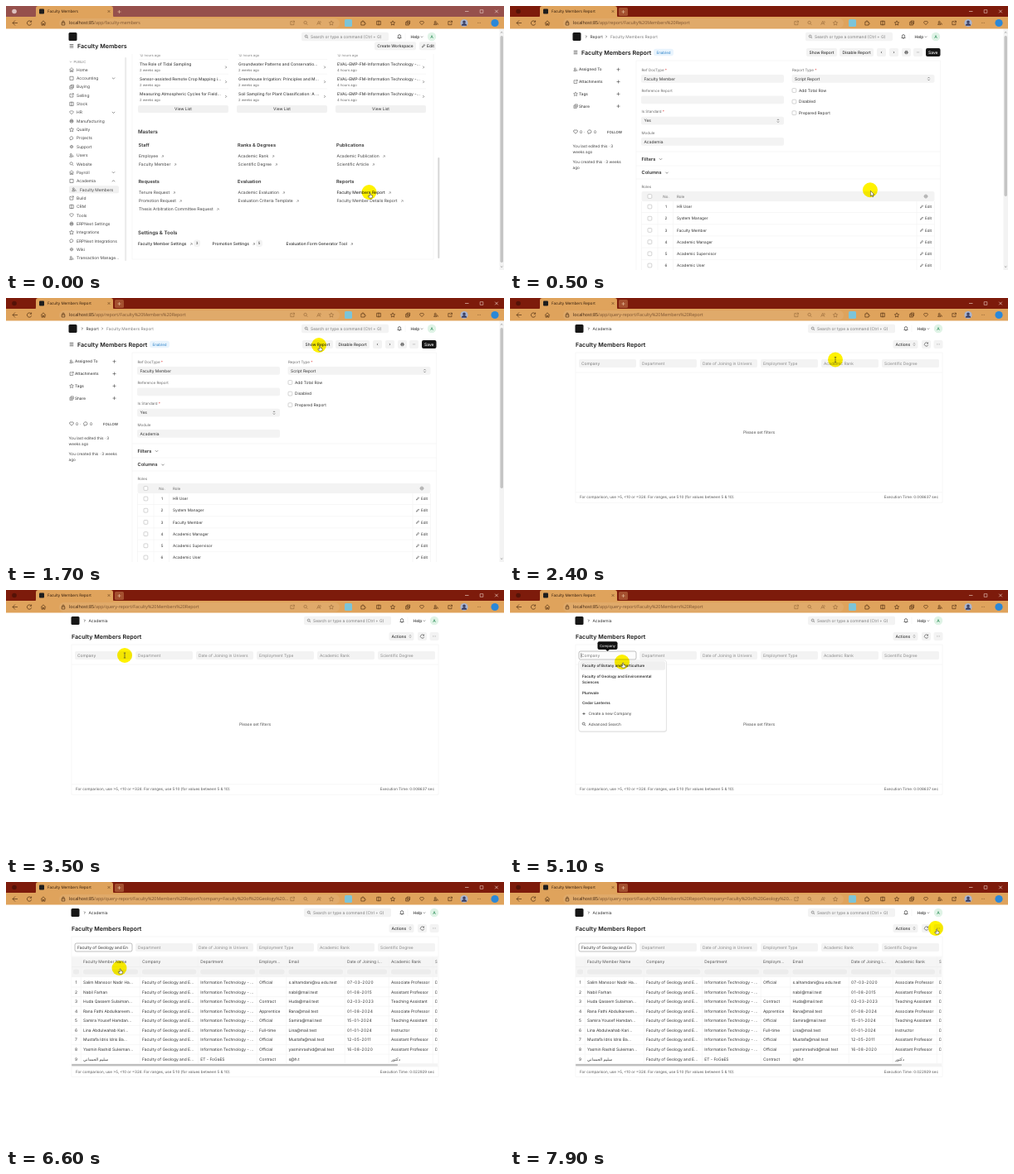
An HTML page for the animation above (8000 ms loop, 600 by 319 pixels).

```html
<!DOCTYPE html>
<html lang="en">
<head>
<meta charset="utf-8">
<title>Faculty Members Report</title>
<style>
html, body { margin: 0; width: 100%; height: 100%; overflow: hidden; background: #fff; }
svg { display: block; width: 100%; height: 100%; font-family: Inter, "Noto Sans", sans-serif; text-rendering: geometricPrecision; }
.chrome { font-family: "Open Sans", "Noto Sans", sans-serif; }
#halo { mix-blend-mode: multiply; }
</style>
</head>
<body>
<svg id="stage" viewBox="0 0 600 319"></svg>
<script>
const INK = '#333', GRAY = '#7c7c7c', PALE = '#f3f3f3', LINE = '#f1f1f1', BROWN = '#4a2a10', TAN = '#96693a';

const escape = s => String(s).replace(/&/g, '&amp;').replace(/</g, '&lt;');
// y is the vertical middle of the text
const text = (x, y, s, { size = 4.9, fill = INK, weight = 400, anchor = 'start', space = 0, tail = '' } = {}) =>
  `<text x="${x}" y="${y + size * .36}" font-size="${size}" fill="${fill}" font-weight="${weight}" text-anchor="${anchor}"${space ? ` letter-spacing="${space}"` : ''}>${escape(s)}${tail}</text>`;
const rect = (x, y, w, h, fill = PALE, r = 0, stroke = 'none') =>
  `<rect x="${x}" y="${y}" width="${w}" height="${h}" rx="${r}" fill="${fill}" stroke="${stroke}" stroke-width=".6"/>`;
const circle = (x, y, r, fill) => `<circle cx="${x}" cy="${y}" r="${r}" fill="${fill}"/>`;
const path = (d, stroke = LINE, width = .6, fill = 'none') =>
  `<path d="${d}" stroke="${stroke}" stroke-width="${width}" fill="${fill}"/>`;
const hline = (x1, x2, y, color) => path(`M${x1} ${y}H${x2}`, color);
const vline = (x, y1, y2, color) => path(`M${x} ${y1}V${y2}`, color);
const group = (id, body) => `<g id="${id}">${body}</g>`;
const each = (items, fn) => items.map(fn).join('');

// icons drawn around 0,0 in a box of about 6 px
const ICONS = {
  back: 'M3 0H-3M0-3L-3 0L0 3',
  refresh: 'M2.3-1.5A2.7 2.7 0 1 0 2.7 .8M2.6-3V-1.2H.8',
  home: 'M-2.7 0L0-2.7L2.7 0M-2-.5V2.7H-.6V.8H.6V2.7H2V-.5',
  lock: 'M-1.8-.4H1.8V2.5H-1.8ZM-1.1-.4V-1.4A1.1 1.1 0 0 1 1.1-1.4V-.4',
  open: 'M0-2H-2.3V2.3H2V0M.5-2.5H2.5V-.5M2.5-2.5L0 0',
  search: 'M-2.2-.5A1.8 1.8 0 1 0 1.4-.5A1.8 1.8 0 1 0-2.2-.5M1 .9L2.5 2.5',
  letter: 'M-2.5 2.3L-.3-2.3L2 2.3M-1.7 .8H1.2M1.5-2.5Q3-1.5 1.8 0',
  star: 'M0-2.8L.9-.9L2.8-.7L1.4 .7L1.8 2.7L0 1.7L-1.8 2.7L-1.4 .7L-2.8-.7L-.9-.9Z',
  box: 'M-2.3-2.3H2.3V2.3H-2.3Z',
  split: 'M-2.5-2.3H2.5V2.3H-2.5ZM0-3V3',
  stack: 'M-2.5-1H1.5V2.7H-2.5ZM-1-1V-2.6H2.7V1H1.5M-.5 0V1.8M-1.4 .9H.4',
  heart: 'M0 2.3L-2.2 0A1.3 1.3 0 0 1 0-1.6A1.3 1.3 0 0 1 2.2 0Z',
  bubble: 'M-2 1A2.2 2 0 1 1 0 1.8L-1.8 2.3Z',
  plus: 'M-2 0H2M0-2V2',
  close: 'M-1.8-1.8L1.8 1.8M1.8-1.8L-1.8 1.8',
  menu: 'M-2.3-1.8H2.3M-2.3 0H2.3M-2.3 1.8H2.3',
  down: 'M-1.6-.8L0 .8L1.6-.8',
  up: 'M-1.6 .8L0-.8L1.6 .8',
  right: 'M-.7-1.4L.7 0L-.7 1.4',
  left: 'M.7-1.4L-.7 0L.7 1.4',
  sort: 'M-1.1-.7L0-1.9L1.1-.7M-1.1 .7L0 1.9L1.1 .7',
  bell: 'M-2.2 1.5H2.2L1.6 .5V-.8A1.6 1.6 0 0 0-1.6-.8V.5ZM-.6 2.5H.6',
  dots: 'M-2-.1H-1.4M-.3-.1H.3M1.4-.1H2',
  print: 'M-1.3-.6V-2.2H1.3V-.6M-1.3 1.2H-2.2V-.6H2.2V1.2H1.3M-1.3 .4H1.3V2.2H-1.3Z',
  gear: 'M-1.8-1L0-2.1L1.8-1V1L0 2.1L-1.8 1ZM-.6 0A.6 .6 0 1 0 .6 0A.6 .6 0 1 0-.6 0',
  pencil: 'M-1.8 1.8L-1.4 .4L1.2-2L2-1.2L-.5 1.4Z',
  people: 'M-2.5 2.2Q-2.3 .2-.8 .2T1 2.2ZM-1.9-1.1A1.1 1.1 0 1 0 .3-1.1A1.1 1.1 0 1 0-1.9-1.1M1 0Q2.5 .2 2.6 2.2',
  puzzle: 'M-2.3-1.4H-.8A.9 .9 0 1 1 .8-1.4H2V.1A.9 .9 0 1 1 2 1.5V2.7H-2.3Z',
};
const icon = (name, x, y, color = '#555', width = .65, scale = 1) =>
  `<g transform="translate(${x} ${y}) scale(${scale})">${path(ICONS[name], color, width)}</g>`;
const button = (x, w, y, label, fill = PALE, ink = INK) =>
  rect(x, y - 5, w, 10, fill, 2) + text(x + w / 2, y, label, { fill: ink, weight: 500, anchor: 'middle' });
const iconButton = (x, y, name) => rect(x, y - 5, 11, 10, PALE, 2) + icon(name, x + 5.5, y, INK, .7, .8);

function browser() {
  const pageTools = [['open', 345], ['search', 361], ['letter', 377], ['star', 392]];
  const tools = [['puzzle', 430], ['split', 449], ['star', 466], ['stack', 484], ['heart', 501], ['people', 518], ['open', 535], ['dots', 570]];
  const toolRow = (items, color) => each(items, ([name, x]) => icon(name, x, 20.5, color, .65, .95));
  return `<g class="chrome">` + group('titleBar', rect(0, 0, 600, 14, 'inherit')) + rect(0, 13, 600, 14.5, '#dfa35c') +
    path('M34 14Q36 14 36 11V3Q36 0 39 0H126Q129 0 129 3V11Q129 14 131 14Z', 'none', 0, '#dfa35c') +
    group('windowIcons', circle(10, 6.5, 2.8, 'inherit') + icon('box', 27, 6.5, 'inherit')) +
    rect(40, 3.5, 6, 6, '#1d1d1d', 1) + icon('close', 124, 6.5, BROWN, .6, .8) +
    group('newTab', rect(131, 2, 11, 10, '#a4502f', 1.5)) + icon('plus', 136.5, 7, '#e8c3a0') +
    path('M553 6.5H557.5', '#f3dcd2') + icon('box', 573, 6.5, '#f3dcd2', .7, .8) + icon('close', 591, 6.5, '#f3dcd2') +
    rect(64, 15, 338, 11.5, '#e0aa6a', 5.7) +
    icon('back', 11, 20.5, BROWN) + icon('refresh', 28, 20.5, BROWN) + icon('home', 45, 20.5, BROWN) + icon('lock', 69, 20.5, BROWN) +
    toolRow(pageTools, TAN) + toolRow(tools, BROWN) +
    rect(408, 16, 9, 9, '#7cc4d8', 1.5) + circle(552, 20.5, 4.6, '#a9b4cf') +
    circle(552, 19.2, 1.7, '#3b3f63') + path('M548.8 23.7Q549 21 552 21T555.2 23.7Z', 'none', 0, '#3b3f63') +
    circle(589, 20.5, 4.6, '#2b88d8') +
    `<text id="tab" x="50" y="8.3" font-size="4.65" fill="#2a1608"></text>` +
    `<text x="76" y="22.4" font-size="5.37" fill="#3a200e">localhost:85<tspan id="url" fill="#7a5230"></tspan></text></g>`;
}

const navbar = dx => `<g transform="translate(${dx} 0)">` + rect(75.5, 32, 10, 10, '#171717', 1.5) +
  rect(356, 31.7, 105, 10.6, PALE, 2) + icon('search', 362, 37, '#555', .7, .8) +
  text(367, 37, 'Search or type a command (Ctrl + G)', { fill: GRAY }) +
  icon('bell', 474, 37, INK) + vline(481, 33, 41) + text(487.5, 37, 'Help', { weight: 500 }) + icon('down', 501, 37.2, INK, .6, .8) +
  circle(513, 37, 5.2, '#dff3e6') + text(513, 37, 'A', { size: 5, fill: '#2f8f5b', anchor: 'middle', weight: 500 }) + '</g>';

const title = (x, y, s) => text(x, y, s, { size: 7.1, weight: 600, fill: '#171717' });
const crumbs = (x, s, more = '') => icon('right', x - 4.7, 37, INK) + text(x, 37, s) + more;
const scrollTrack = thumb => rect(594.5, 27.5, 5.5, 292, '#f3f3f3') + icon('up', 597.2, 32, '#777', .8, .8) +
  icon('down', 597.2, 315, '#777', .8, .8) + rect(595.5, 36, 3.5, thumb, '#c4c4c4', 1.7);

function workspace() {
  const menu = ['Home', 'Accounting', 'Buying', 'Selling', 'Stock', 'HR', 'Manufacturing', 'Quality', 'Projects', 'Support', 'Users',
    'Website', 'Payroll', 'Academia', 'Faculty Members', 'Build', 'CRM', 'Tools', 'ERPNext Settings', 'Integrations',
    'ERPNext Integrations', 'Wiki', 'Transaction Manage...'];
  const shapes = ['home', 'box', 'stack', 'open', 'split', 'heart', 'print', 'star', 'bubble', 'gear', 'people', 'search'];
  const folds = { Accounting: 'down', HR: 'down', Payroll: 'down', Academia: 'up' };
  const sidebar = each(menu, (label, i) => {
    const y = 77 + i * 10.34, child = label === 'Faculty Members';
    return (child ? rect(76, y - 4.6, 60, 9.2, '#f0f0f0', 2) : '') +
      icon(child ? 'people' : shapes[i % shapes.length], child ? 82 : 79, y, '#555', .65, .9) +
      text(child ? 89 : 85, y, label, { fill: '#444' }) + (folds[label] ? icon(folds[label], 129.5, y) : '');
  });
  const evaluation = 'EVAL-EMP-FM-Information Technology -...';
  const lists = [
    [161, '2 weeks ago', ['The Role of Tidal Sampling', 'Sensor-assisted Remote Crop Mapping i...', 'Measuring Atmospheric Cycles for Field...']],
    [280, '2 weeks ago', ['Groundwater Patterns and Conservatio...', 'Greenhouse Irrigation: Principles and M...', 'Soil Sampling for Plant Classification: A ...']],
    [399, '4 hours ago', [evaluation, evaluation, evaluation]]];
  const cards = each(lists, ([x, age, names]) => text(x, 59.7, '12 hours ago', { size: 4.2, fill: GRAY }) +
    each(names, (name, i) => {
      const y = 70.5 + i * 17.7;
      return hline(x - 1, x + 107, y - 6) + text(x, y, name, { size: 4.9, weight: 500, fill: '#444' }) +
        text(x, y + 7.2, age, { size: 4.2, fill: '#666' }) + icon('right', x + 104, y + 3.5);
    }) + rect(x - 2, 120, 109, 9, '#f1f1f1', 2) + text(x + 52.5, 124.5, 'View List', { anchor: 'middle' }));
  const arrow = '<tspan dx="4" font-size="4.4" fill="#555">↗</tspan>';
  const links = [
    [159.5, 168, 'Staff', ['Employee', 'Faculty Member']],
    [279, 168, 'Ranks & Degrees', ['Academic Rank', 'Scientific Degree']],
    [398, 168, 'Publications', ['Academic Publication', 'Scientific Article']],
    [159.5, 212, 'Requests', ['Tenure Request', 'Promotion Request', 'Thesis Arbitration Committee Request']],
    [279, 212, 'Evaluation', ['Academic Evaluation', 'Evaluation Criteria Template']],
    [398, 212, 'Reports', ['Faculty Members Report', 'Faculty Member Details Report']]];
  const heading = (x, y, s, size) => text(x, y, s, { size, weight: 600 });
  const badge = (x, n) => rect(x - 4, 282.5, 8, 8.5, PALE, 3) + text(x, 286.8, n, { size: 4.4, anchor: 'middle' });
  const setting = (x, s) => text(x, 286.8, s, { weight: 500, tail: arrow });
  return cards + rect(72, 27.5, 450, 31, '#fff') + navbar(0) +
    icon('menu', 79, 48.3, INK) + title(86, 48.3, 'Faculty Members') +
    button(444, 50, 48.3, 'Create Workspace') + rect(498, 43.3, 20, 10, PALE, 2) +
    icon('pencil', 503, 48.3, INK, .65, .9) + text(507, 48.3, 'Edit', { weight: 500 }) +
    icon('down', 78, 67.5, GRAY, .6, .8) + text(81.5, 67.5, 'PUBLIC', { size: 4.1, fill: GRAY }) + sidebar +
    rect(143, 62, 2.2, 246, '#ececec', 1) + vline(152, 58, 306) + vline(515, 58, 306) + hline(152, 515, 306) +
    rect(520.3, 183, 2, 122, '#d6d6d6', 1) +
    heading(159, 151.5, 'Masters', 6.1) + heading(159, 273.5, 'Settings & Tools', 6.1) +
    each(links, ([x, y, head, items]) => heading(x, y, head, 5.65) +
      each(items, (s, i) => text(x + .5, y + 12.7 + i * 10.3, s, { size: 5, tail: arrow, fill: s === 'Faculty Members Report' ? '#111' : '#444' }))) +
    setting(159, 'Faculty Member Settings') + badge(230, 3) + setting(248.5, 'Promotion Settings') + badge(305, 5) +
    setting(337.5, 'Evaluation Form Generator Tool') + scrollTrack(274);
}

function reportForm() {
  const small = { size: 4.5, fill: '#6a6a6a' };
  const star = '<tspan fill="#e24c4c"> *</tspan>';
  const field = (x, y, label, value, required, select) => text(x, y, label, { ...small, tail: required ? star : '' }) +
    rect(x - .5, y + 6, 172, 9.7, PALE, 2) + text(x + 3, y + 11, value) + (select ? icon('sort', x + 164.5, y + 11) : '');
  const check = (x, y) => rect(x, y - 2.4, 4.8, 4.8, '#fff', 1, '#b5b5b5');
  const roles = ['HR User', 'System Manager', 'Faculty Member', 'Academic Manager', 'Academic Supervisor', 'Academic User'];
  const notes = [[169, 'You last edited this · 3'], [176, 'weeks ago'], [188, 'You created this · 3 weeks'], [195, 'ago']];
  return navbar(0) + crumbs(96.5, 'Report', icon('right', 116, 37) + text(121, 37, 'Faculty Members Report', { fill: GRAY })) +
    icon('menu', 79, 56, INK) + title(86, 56, 'Faculty Members Report') +
    rect(173, 51.7, 24, 8.6, '#e9f4fd', 3) + text(185, 56, 'Enabled', { size: 4.5, fill: '#2f84c9', anchor: 'middle' }) +
    button(357, 37, 56, 'Show Report') + button(397, 41, 56, 'Disable Report') +
    each([[442, 'left'], [457, 'right'], [472, 'print'], [486, 'dots']], ([x, name]) => iconButton(x, 56, name)) +
    button(501, 17.5, 56, 'Save', '#171717', '#fff') +
    each(['Assigned To', 'Attachments', 'Tags', 'Share'], (s, i) => {
      const y = 76.7 + i * 14.8;
      return icon(['people', 'open', 'star', 'stack'][i], 79, y, '#555', .65, .85) + text(83, y, s, { weight: 500, size: 4.7, fill: '#444' }) + icon('plus', 130.5, y);
    }) +
    icon('heart', 79, 152) + text(84, 152, '0  ·') + icon('bubble', 96, 152) + text(101, 152, '0') +
    text(117, 152, 'FOLLOW', { size: 4.3, weight: 500 }) + each(notes, ([y, s]) => text(75.5, y, s, { size: 4.7, fill: '#444' })) +
    vline(152, 66, 319) + vline(518.5, 66, 319) + hline(152, 518.5, 66) +
    field(158.5, 77, 'Ref DocType', 'Faculty Member', true) + field(158.5, 102.5, 'Reference Report', '') +
    field(158.5, 127.7, 'Is Standard', 'Yes', true, true) + field(158.5, 153, 'Module', 'Academia') +
    field(340, 77, 'Report Type', 'Script Report', true, true) +
    each(['Add Total Row', 'Disabled', 'Prepared Report'], (s, i) => check(340, 102 + i * 13.6) + text(348, 102 + i * 13.6, s)) +
    each([176, 193, 209], y => hline(152, 518.5, y)) +
    text(158.5, 184.7, 'Filters', { size: 5.65, weight: 600 }) + icon('down', 181.5, 185) +
    text(158.5, 201, 'Columns', { size: 5.65, weight: 600 }) + icon('down', 189, 201.5) +
    text(158.5, 218, 'Roles', small) + rect(158.5, 224, 353, 12, PALE, 2) + check(166, 230) +
    text(188, 230, 'No.', { ...small, anchor: 'middle' }) + text(201, 230, 'Role', small) + icon('gear', 501, 230, GRAY) +
    each(roles, (role, i) => {
      const y = 242.5 + i * 14.2;
      return check(166, y) + text(188, y, i + 1, { size: 4.6, anchor: 'middle' }) + text(201, y, role, { size: 4.7 }) +
        icon('pencil', 496, y, INK, .6, .85) + text(500, y, 'Edit', { size: 4.5 }) + hline(158.5, 511.5, y + 7);
    }) + each([158.5, 178, 196.5, 490, 511.5], x => vline(x, 236, 319)) + scrollTrack(194);
}

function queryReport() {
  const names = ['Company', 'Department', 'Date of Joining in Univers', 'Employment Type', 'Academic Rank', 'Scientific Degree'];
  const message = (id, s) => group(id, text(300, 162.5, s, { anchor: 'middle', fill: '#555' }));
  const footer = (id, y, seconds) => group(id,
    text(84, y, 'For comparison, use >5, <10 or =324. For ranges, use 5:10 (for values between 5 & 10).', { size: 4.55, fill: '#555' }) +
    text(516, y, `Execution Time: ${seconds} sec`, { size: 4.55, fill: '#555', anchor: 'end' }) +
    hline(79, 521, y - 6) + hline(79, 521, y + 6.5) + vline(79, 66, y + 6.5) + vline(521, 66, y + 6.5));
  return navbar(3) + crumbs(99.5, 'Academia') + title(79, 56, 'Faculty Members Report') +
    rect(461.5, 51, 30, 10, PALE, 2) + text(464.5, 56, 'Actions', { weight: 500 }) + icon('sort', 487, 56, INK, .6, .8) +
    iconButton(496, 56, 'refresh') + iconButton(510.5, 56, 'dots') + hline(79, 521, 66) + hline(79, 521, 90) +
    each(names, (s, i) => rect(83 + i * 73, 74, 69, 10, PALE, 2) + (i ? text(86 + i * 73, 79, s, { fill: '#8a8a8a' }) : '')) +
    group('focus', rect(83, 74, 69, 10, '#fcfcfc', 2, '#999')) +
    group('placeholder', text(86, 79, 'Company', { fill: GRAY })) + group('caret', vline(85.8, 76.3, 81.7, INK)) +
    group('chosen', text(86, 79, 'Faculty of Geology and En')) +
    message('empty', 'Please set filters') + message('loading', 'Loading...') +
    footer('footerEmpty', 240.7, '0.008637') + footer('footerFull', 229, '0.022929') + group('table', table()) +
    group('dropdown', dropdown()) +
    group('tooltip', rect(105.5, 62.3, 24, 9.7, '#111', 2) + path('M115 71.8H120L117.5 74Z', 'none', 0, '#111') +
      text(117.5, 67.2, 'Company', { size: 4.2, fill: '#fff', anchor: 'middle' }));
}

function table() {
  const cols = [93, 164, 234.3, 305, 340.5, 411, 464, 517];
  const heads = ['Faculty Member Name', 'Company', 'Department', 'Employm...', 'Email', 'Date of Joining i...', 'Academic Rank', 'S'];
  const faculty = 'Faculty of Geology and E...', department = 'Information Technology - ...';
  const people = [
    ['Salim Mansoor Nadir Ha...', 'Official', 's.alhamdani@xu.edu.test', '07-03-2020', 'Associate Professor'],
    ['Nabil Farhan', '', 'nabil@mail.test', '01-08-2015', 'Assistant Professor'],
    ['Huda Qassem Sulaiman...', 'Contract', 'Huda@mail.test', '02-03-2023', 'Teaching Assistant'],
    ['Rana Fathi Abdulkareem...', 'Apprentice', 'Rana@mail.test', '01-08-2024', 'Associate Professor'],
    ['Samira Yousef Hamdan...', 'Official', 'Samira@mail.test', '15-01-2024', 'Teaching Assistant'],
    ['Lina Abdulwahab Kari...', 'Full-time', 'Lina@mail.test', '01-01-2024', 'Instructor'],
    ['Mustafa Idris Idris Ba...', 'Official', 'Mustafa@mail.test', '12-05-2011', 'Assistant Professor'],
    ['Yasmin Rashid Suleiman...', 'Official', 'yasminrashid@mail.test', '16-08-2020', 'Assistant Professor'],
    ['سليم الحمداني', 'Contract', 's@h.t', '', 'دكتور']];
  return rect(79, 90.5, 441, 129, '#fff') + rect(79, 90.5, 441, 24.5, '#f5f5f5') + hline(79, 520, 102.5, '#ebebeb') +
    `<clipPath id="grid"><rect x="79" y="90" width="440.5" height="129"/></clipPath><g clip-path="url(#grid)">` +
    rect(81, 105.5, 7, 6, '#ececec', 2) +
    each(heads, (s, i) => text(cols[i], 96.5, s, { fill: '#555' }) +
      rect(cols[i], 105.5, (cols[i + 1] || 540) - cols[i] - 5, 6, '#ececec', 2.5) + vline(cols[i] - 2.8, 90.5, 219)) +
    each(people, ([name, type, mail, date, rank], i) => {
      const y = 121.2 + i * 11.58;
      const cells = [name, faculty, i === 8 ? 'ET - FoGaES' : department, type, mail, date, rank, i === 8 ? '' : 'D'];
      return text(84.5, y, i + 1, { anchor: 'middle' }) + hline(79, 520, y + 5.8) +
        each(cells, (s, c) => text(cols[c], y, s, { space: c === 5 ? .35 : 0 }));
    }) + '</g>' + rect(79, 219.3, 441, 3.6, '#f3f3f3') + rect(79, 220, 393, 2.2, '#bdbdbd', 1);
}

function dropdown() {
  const item = (x, y, s) => text(x, y, s, { size: 4.55, weight: 600 });
  const action = (y, name, s) => icon(name, 89, y, INK, .8, .8) + text(94.5, y, s, { size: 4.7, fill: '#444' });
  return rect(82.6, 85.8, 106.4, 86, '#e4e4e4', 3) + rect(83, 85, 105.4, 85.8, '#fff', 2.5, '#dcdcdc') +
    group('hoverFirst', rect(84.5, 86.3, 102.5, 10.4, '#f0f0f0', 2)) + group('hoverSecond', rect(84.5, 98.5, 102.5, 18, '#f0f0f0', 2)) +
    item(87, 91.5, 'Faculty of Botany and Horticulture') + item(87, 104, 'Faculty of Geology and Environmental') + item(87, 111, 'Sciences') +
    item(87, 124, 'Plumvale') + item(87, 136.7, 'Cedar Lanterns') +
    action(149.5, 'plus', 'Create a new Company') + action(162, 'search', 'Advanced Search');
}

const pointer = group('halo', circle(0, 0, 9, '#fff200')) + group('cursor',
  group('hand', path('M.6 1.2Q1.2 .4 1.8 1.2V3.3L4 3.9Q4.4 5.4 3.5 7H.2L-1.3 4.7Q-.9 4 .6 4.9Z', '#222', .5, '#fff')) +
  group('arrow', path('M.5 1V7.5L2 6.2L3 8.5L4 8L3 5.8H5Z', '#222', .5, '#fff')) +
  group('beam', path('M-1.2-3H1.2M0-3V3M-1.2 3H1.2', '#333', .6)));

document.getElementById('stage').innerHTML = rect(0, 0, 600, 319, '#fff') + group('workspace', workspace()) +
  group('form', reportForm()) + group('query', queryReport()) + browser() + pointer;

const el = id => document.getElementById(id);
const show = (id, on) => el(id).style.display = on ? '' : 'none';
const paint = (id, color) => {
  for (const shape of el(id).children) shape.style.fill = color;
};

const LOOP = 8000, STEP = 100;
const ACTIVATE = 100, OPEN_FORM = 500, OPEN_QUERY = 2100, TOOLTIP = 4100, FOCUS = 4800, CHOOSE = 5800, LOAD = 6000, RESULT = 6600;
// time, x, y
const TRAIL = [[0, 437.5, 225], [400, 437.5, 225], [1000, 389, 188], [1700, 377, 57], [2100, 377, 57], [2400, 392, 74.5],
  [2700, 400, 83], [3000, 170, 80], [3200, 170, 80], [3500, 143, 79], [3900, 95, 80], [4100, 95, 80], [4300, 126, 80],
  [5000, 126, 80], [5100, 135, 87], [5300, 135, 88], [5600, 136.5, 104], [7100, 136.5, 104], [7800, 513, 56], [LOOP, 513, 56]];

function pointerAt(t) {
  const i = TRAIL.findIndex(([end]) => end > t);
  const [t0, x0, y0] = TRAIL[i - 1], [t1, x1, y1] = TRAIL[i];
  const p = (t - t0) / (t1 - t0), k = p * p * (3 - 2 * p);
  return [x0 + (x1 - x0) * k, y0 + (y1 - y0) * k];
}

function draw(t) {
  const [x, y] = pointerAt(t), inForm = t >= OPEN_FORM && t < OPEN_QUERY, menuOpen = t >= FOCUS && t < CHOOSE;
  const active = t >= ACTIVATE;
  paint('titleBar', active ? '#7d1b0b' : '#96504c');
  paint('windowIcons', active ? '#541207' : '#dcc0bd');
  show('newTab', active);
  show('workspace', t < OPEN_FORM);
  show('form', inForm);
  show('query', t >= OPEN_QUERY);
  el('tab').textContent = t < OPEN_FORM ? 'Faculty Members' : 'Faculty Members Report';
  el('url').textContent = t < OPEN_FORM ? '/app/faculty-members'
    : inForm ? '/app/report/Faculty%20Members%20Report'
    : '/app/query-report/Faculty%20Members%20Report' + (t < RESULT ? '' : '?company=Faculty%20of%20Geology%20...');

  show('focus', t >= FOCUS);
  show('placeholder', t < CHOOSE);
  show('caret', menuOpen);
  show('chosen', t >= CHOOSE);
  show('tooltip', t >= TOOLTIP && t < LOAD);
  show('dropdown', menuOpen);
  show('hoverFirst', y < 98);
  show('hoverSecond', y >= 98);
  show('empty', t < LOAD);
  show('loading', t >= LOAD && t < RESULT);
  show('footerEmpty', t < RESULT);
  show('footerFull', t >= RESULT);
  show('table', t >= RESULT);

  const beam = t >= 2300 && t < 5100, arrow = t >= OPEN_FORM && t < 1700;
  show('beam', beam);
  show('arrow', arrow);
  show('hand', !beam && !arrow);
  for (const id of ['halo', 'cursor']) el(id).setAttribute('transform', `translate(${x} ${y})`);
}

function tick() {
  draw(Math.floor(performance.now() % LOOP / STEP) * STEP);
  requestAnimationFrame(tick);
}
tick();
</script>
</body>
</html>
```
